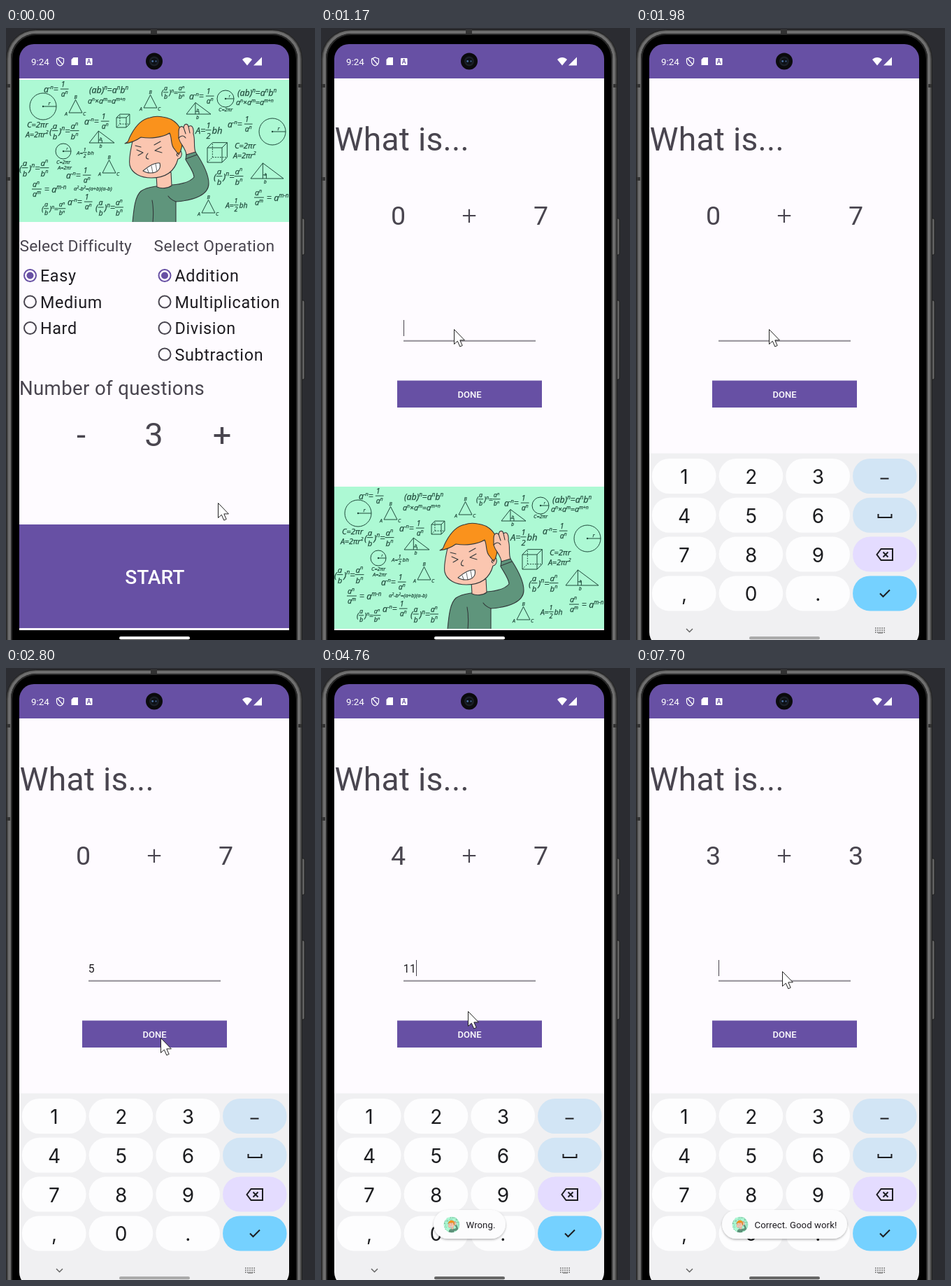
An HTML page that plays this animation: 442x874 px, repeating every 8000 ms.

```html
<!DOCTYPE html>
<html lang="en">
<head>
<meta charset="utf-8">
<title>Math quiz</title>
<style>
  html, body { margin: 0; width: 100%; height: 100%; overflow: hidden; background: #2b2c31; }
  svg { display: block; }
  text { font-family: Roboto, sans-serif; white-space: pre; }
  .math { font-family: "Open Sans", sans-serif; font-style: italic; fill: #1f4a3b; stroke: #1f4a3b; stroke-width: .25; }
  .line { fill: none; stroke: #1f4a3b; stroke-width: 1; }
  .key { font-family: Inter, sans-serif; font-size: 28px; fill: #1c1d20; text-anchor: middle; }
</style>
</head>
<body>
<svg id="stage" width="442" height="874" viewBox="0 0 442 874"></svg>
<script>
const LOOP = 8000;
const PURPLE = '#6750a4', INK = '#49454f', DARK = '#1d1b20', PAPER = '#fefbff';

const rect = (x, y, w, h, fill, more = '') =>
  `<rect x="${x}" y="${y}" width="${w}" height="${h}" fill="${fill}" ${more}/>`;
const circle = (x, y, r, more) => `<circle cx="${x}" cy="${y}" r="${r}" ${more}/>`;
const path = (d, more = 'class="line"') => `<path d="${d}" ${more}/>`;
const label = (x, y, size, str, { fill = INK, gap = 0, mid = false, weight = 400, id = '' } = {}) =>
  `<text ${id && `id="${id}"`} x="${x}" y="${y}" font-size="${size}" fill="${fill}" font-weight="${weight}"
    letter-spacing="${gap}em" ${mid ? 'text-anchor="middle"' : ''}>${str}</text>`;

// Formulas: ^x or ^(xy) is a superscript, {a|b} a fraction.
const ruler = document.createElement('canvas').getContext('2d');
function textWidth(str, size) {
  ruler.font = `italic ${size}px "Open Sans", sans-serif`;
  return ruler.measureText(str).width;
}
function formula(x, y, size, src) {
  let out = '';
  const put = (str, px, py, s) => {
    out += `<text class="math" x="${px}" y="${py}" font-size="${s}">${str}</text>`;
    return textWidth(str, s);
  };
  const run = (str, px, py, s) => {
    let w = 0;
    for (const [, top, bottom, group, single, plain] of
      str.matchAll(/\{(.+?)\|(.+?)\}|\^\((.+?)\)|\^(.)|([^{^]+)/g)) {
      if (top) {
        const a = run(top, px + w + 1, py - s * .62, s * .85);
        const b = run(bottom, px + w + 1, py + s * .52, s * .85);
        const bar = Math.max(a, b) + 2;
        out += path(`M${px + w} ${py - s * .4}h${bar}`);
        w += bar + 1;
      } else if (plain) w += put(plain, px + w, py, s);
      else w += put(group || single, px + w, py - s * .42, s * .65);
    }
    return w;
  };
  run(src, x, y, size);
  return out;
}

const POWER = 'a^(-n)= {1|a^n}', RATIO = '({a|b})^n={a^n|b^n}', QUOTIENT = '{a^n|a^m} = a^(m-n)';
const PRODUCT = '(ab)^n=a^nb^n', SUM = 'a^n×a^m=a^(m+n)', AREA = 'A={1|2}bh';
const group = (src, size, spots) => spots.map(([x, y]) => formula(x, y, size, src)).join('');

const round = (x, y, r) =>
  circle(x, y, r, 'class="line"') + circle(x, y, 1.2, 'fill="#1f4a3b"') +
  path(`M${x} ${y}h${r}`) + formula(x + r * .4, y - 2, r * .4, 'r');
const triangle = (x, y) =>
  path(`M${x} ${y}l9.500 -18.500 9.500 18.500z`) + formula(x - 6, y + 4, 7, 'A') +
  formula(x + 7.500, y - 20, 7, 'B') + formula(x + 20, y + 4, 7, 'C');
const peak = (x, y, w) =>
  path(`M${x} ${y}l${w * .37} ${-w * .47} ${w * .63} ${w * .47}zm${w * .37} 0v${-w * .47}m0 ${w * .36}h5v${w * .11}`) +
  formula(x + w * .4, y + 7, 7, 'b') + formula(x + w * .42, y - 4, 6, 'h');
const cube = (x, y, s) =>
  path(`M${x} ${y}h${s}v${s}h${-s}zl${s * .35} ${-s * .35}h${s}v${s}l${-s * .35} ${s * .35}M${x + s} ${y}l${s * .35} ${-s * .35}`) +
  path(`M${x} ${y + s}l${s * .35} ${-s * .35}h${s}m${-s} 0v${-s}`, 'class="line" stroke-dasharray="2 1.500"');

const board =
  group(POWER, 12.2, [[54, 92], [112, 138], [86, 215], [88, 253], [262, 102], [317, 142]]) +
  group(RATIO, 13.4, [[62, 152], [19, 205], [297, 217]]) +
  group(RATIO, 10.5, [[222, 96], [51, 262]]) + group(RATIO, 12.5, [[128, 261]]) +
  group(PRODUCT, 12.4, [[119, 93], [331, 97]]) +
  group(SUM, 10.7, [[117, 108], [329, 110]]) +
  group(QUOTIENT, 12.4, [[37, 235], [355, 247]]) +
  group(AREA, 13, [[271, 151]]) + group(AREA, 10.5, [[314, 257]]) + group(AREA, 8, [[101, 181]]) +
  group('C=2πr', 11.3, [[30, 142], [327, 172]]) + group('A=2πr^2', 10.8, [[28, 156], [325, 186]]) +
  group('C=2πr', 7.5, [[72, 194], [304, 119]]) + group('A=2πr', 7.5, [[74, 202]]) +
  formula(97, 232, 7.8, 'a^2-b^2=(a+b)(a-b)') +
  round(53, 112, 19) + round(82, 176, 11) + round(314, 101, 12) + round(381, 148, 19) +
  triangle(90, 121) + triangle(138, 207) + triangle(197, 114) + triangle(280, 264) +
  peak(119, 164, 36) + peak(258, 123, 35) + peak(350, 215, 47) +
  cube(158, 128, 14) + cube(288, 171, 21);

const pen = 'stroke="#33383a" stroke-width="1.1" stroke-linejoin="round" stroke-linecap="round"';
const skin = `fill="#fbc6b0" ${pen}`, bare = `fill="none" ${pen}`;
const boy =
  path('M181 278C183 256 185 240 193 233C200 228 209 227 215 226L238 224C252 223 264 219 269 213C269 206 262 197 257 188L258 179L271 177C281 192 290 208 290 222C290 238 270 246 243 248V278z', `fill="#5f957c" ${pen}`) +
  path('M209 246C211 256 211 266 210 278M243 248C238 246 234 243 232 240M257 187L273 181', bare) +
  path('M215 210L216 227C222 230 232 229 237 225L236 206z', skin) +
  path('M182 157C179 172 175 185 177 196C180 208 193 214 208 214C227 214 241 206 246 187C253 186 253 173 246 174L240 150z', skin) +
  path('M170 165C177 161 173 163 179 152C186 139 194 130 206 128C214 125 219 126 224 127C241 129 252 141 252 156C253 168 251 175 247 181L241 173C235 167 238 158 234 150C223 157 206 158 193 156C186 161 178 164 170 165z', `fill="#fa921c" ${pen}`) +
  path('M247 148C247 141 251 139 254 142C255 136 260 136 261 141C266 137 269 143 268 151C271 160 268 169 271 177L258 181C257 171 249 166 247 157z', skin) +
  path('M254 142L257 151M261 141L263 150M247 157C251 153 254 153 257 157', bare) +
  path('M187 174L196 178L189 182M222 170L213 175L223 178M185 168L193 170M212 167L221 162M203 179C199 184 200 187 204 187M247 178C244 179 243 182 246 183', bare) +
  path('M196 204C201 200 211 191 220 193C222 201 217 207 207 207C202 207 199 206 196 204z', `fill="#fff" ${pen}`) +
  path('M202 201L204 206M208 197L210 207M214 194L216 205', `fill="none" ${pen} opacity=".7"`);

const radio = (x, y, str, on) =>
  circle(x, y, 8.5, `fill="none" stroke="${on ? PURPLE : INK}" stroke-width="2"`) +
  (on ? circle(x, y, 5, `fill="${PURPLE}"`) : '') +
  label(x + 14.4, y + 8.5, 23.4, str, { fill: DARK, gap: .028 });
const radios = (x, names) => names.map((n, i) => radio(x, 353.5 + i * 37.5, n, i === 0)).join('');

const home =
  rect(19, 72, 386, 790, PAPER) + '<use href="#art"/>' +
  label(19.5, 319, 22.8, 'Select Difficulty', { gap: .005 }) +
  label(211.5, 319, 22.8, 'Select Operation', { gap: .016 }) +
  radios(34.5, ['Easy', 'Medium', 'Hard']) +
  radios(227, ['Addition', 'Multiplication', 'Division', 'Subtraction']) +
  label(19, 524, 27.6, 'Number of questions', { gap: .013 }) +
  ['-', '3', '+'].map((s, i) => label([107.5, 211.5, 309][i], 597, 47, s, { mid: true })).join('') +
  rect(19, 709, 386, 148, PURPLE) +
  label(212.8, 794, 28.2, 'START', { fill: '#fff', mid: true, weight: 500 });

const question =
  rect(19, 72, 386, 790, PAPER) + '<use href="#art" y="581"/>' +
  label(19.5, 174.5, 46.2, 'What is...', { gap: .006 }) +
  label(110.5, 281, 37.6, '0', { mid: true, id: 'left' }) +
  label(212, 281, 37.6, '+', { mid: true, weight: 300 }) +
  label(314.5, 281, 37.6, '7', { mid: true, id: 'right' }) +
  label(117.8, 435, 15.7, '', { fill: DARK, gap: .031, id: 'answer' }) +
  rect(118, 445, 189, 2.5, '#d3d0d5', 'id="rule"') +
  rect(118, 446.5, 189, 1, '#55515b', 'id="focus"') +
  rect(118, 417, 1, 23, INK, 'id="caret"') +
  rect(109, 503.5, 207, 38.5, PURPLE) + rect(109, 503.5, 207, 38.5, '#fff', 'id="ripple"') +
  label(212.6, 527.6, 13, 'DONE', { fill: '#fff', mid: true, weight: 500 });

const glyphs = [
  'M349.500 643.500h12', 'M346.500 694v5h19v-5',
  'M350.500 744h16.500v16h-16.500l-6-8zM353.500 748.500l7 7m0-7l-7 7', 'M349 807.500l4.500 4.500 9.500-9.500'];
const keyColors = ['#d2e5f5', '#d2e5f5', '#e4dcff', '#75d1ff'];
const keyboard = rect(19, 607.5, 386, 270, '#f0f0f2') +
  ['123', '456', '789', ',0.'].map((row, r) => {
    const y = 615 + r * 55.8;
    const cap = (c, fill) => rect(23 + c * 95.7, y, 91.5, 50, fill, 'rx="24.5"');
    return [...row].map((s, c) => cap(c, '#fdfdfe') +
      `<text class="key" x="${69 + c * 95.7}" y="${y + 36}">${s}</text>`).join('') +
      cap(3, keyColors[r]) + path(glyphs[r], 'fill="none" stroke="#1c1d20" stroke-width="2"');
  }).join('') +
  path('M72 858l4.500 4.500 4.500-4.500', 'fill="none" stroke="#666" stroke-width="1.500"') +
  path('M342 857h14M342 860h14M342 863h14', 'stroke="#666" stroke-width="1.500" stroke-dasharray="1.600 1.500"') +
  path('M346 864h7', 'stroke="#666" stroke-width="1.200"');

const toast = (id, x, w, str) => `<g id="${id}">
  ${rect(x, 774, w, 41, '#fcfcfd', 'rx="20.5" filter="url(#shadow)"')}
  <g><g transform="translate(${x + 26} 795)" clip-path="url(#disc)">
    <use href="#art" transform="scale(.125) translate(-218 -176)"/></g>
  ${label(x + 46.5, 800, 13.2, str, { fill: DARK, gap: .005 })}</g></g>`;

const phone =
  rect(0, 0, 442, 874, '#2b2c31') +
  [[272, 52], [389, 113]].map(([y, h]) => rect(421, y, 6, h, '#646464', 'rx="2" stroke="#202020"')).join('') +
  rect(.5, 2.5, 423, 940, '#464646', 'rx="42" stroke="#202020"') +
  rect(5, 6, 414, 940, '#000', 'rx="38" stroke="#6e6e6e" stroke-width="4"') +
  rect(8, 9, 408, 940, '#000', 'rx="35" stroke="#2a2a2a" stroke-width="2"') +
  rect(207, 2, 9, 6, '#333') +
  [80, 213].map(y => rect(1, y, 5, 5, '#333')).join('') + rect(418, 80, 5, 5, '#333');

const status =
  rect(19, 23, 386, 49, PURPLE) +
  label(36, 52.5, 13.4, '9:24', { fill: '#fff' }) +
  path('M77.500 42l5 2v4c0 3-2 5-5 6c-3-1-5-3-5-6v-4zM74 44l7 8', 'fill="none" stroke="#fff" stroke-width="1.200"') +
  path('M96.500 42h6.500v11h-9.500v-8z', 'fill="#fff"') +
  rect(114, 43, 9.5, 10, '#fff', 'rx="1"') +
  label(118.7, 51.3, 8.5, 'A', { fill: PURPLE, mid: true, weight: 700 }) +
  path('M338 45c4-4 10-4 14 0l-7 8.500z', 'fill="#fff"') + path('M366 41.500v12h-12z', 'fill="#fff"') +
  circle(212, 47.5, 12, 'fill="#0b0b0d"') + circle(212, 47.5, 7, 'fill="#1b2027"') +
  circle(212, 47.5, 4.5, 'fill="#0d1116"') + circle(209.7, 47.5, 1.4, 'fill="#4a6fa0"') +
  circle(214.5, 47.5, 1.2, 'fill="#38557c"');

document.getElementById('stage').innerHTML = `
<defs>
  <clipPath id="screen"><rect x="19" y="23" width="386" height="861" rx="21"/></clipPath>
  <clipPath id="picture"><rect x="19" y="74" width="386" height="203"/></clipPath>
  <clipPath id="disc"><circle r="11.3"/></clipPath>
  <filter id="shadow" x="-20%" y="-50%" width="140%" height="200%">
    <feDropShadow dx="0" dy="1.5" stdDeviation="1.6" flood-opacity=".3"/></filter>
  <g id="art"><g clip-path="url(#picture)">${rect(19, 74, 386, 203, '#adf9d4')}${board}${boy}</g></g>
</defs>
${phone}
<g clip-path="url(#screen)">
  <g id="home">${home}</g><g id="question">${question}</g>
  ${rect(19, 860, 386, 24, '#000')}
  <g id="keyboard">${keyboard}</g>
  ${rect(162, 869, 101, 4.3, '#fff', 'id="handle" rx="2.1"')}
  ${toast('wrong', 161, 103, 'Wrong.')}${toast('correct', 123, 179, 'Correct. Good work!')}
  ${status}
</g>
<path id="mouse" d="M.5 .5V21.500L5.300 17.200 8.800 25 12.200 23.500 8.800 15.900H15.400z" fill="#fff" stroke="#222" stroke-width="1"/>`;

// Each track lists [start time, value]; a value holds until the next one.
const tracks = {
  open: [[0, 0], [120, .4], [240, .85], [360, 1]],
  mouse: [[0, [303, 678]], [120, [295, 640]], [240, [274, 555]], [360, [254, 484]], [500, [374, 527]],
    [650, [290, 496]], [770, [234, 477]], [920, [203, 443]], [1050, [190, 430]], [2370, [228, 527]],
    [2520, [224, 528]], [2650, [221, 528]], [3310, [213, 512]], [3430, [203, 491]], [3580, [197, 459]],
    [3700, [192, 440]], [4760, [210, 490]], [4880, [223, 519]], [6320, [219, 486]], [6470, [209, 433]]],
  answer: [[0, 'Your Answer...'], [1050, ''], [2370, '5'], [3190, ''], [4610, '1'], [4760, '11'], [5780, '']],
  caret: [[0, 0], [1050, 1], [1710, 0], [2130, 1], [2800, 0], [3190, 1], [3700, 0], [4100, 1],
    [5270, 0], [5780, 1], [6320, 0], [6730, 1], [7300, 0], [7700, 1]],
  sums: [[0, '07'], [3190, '47'], [5780, '33']],
  keys: [[0, 300], [1320, 44.5], [1440, 10], [1560, 0]],
  handle: [[0, '#fff'], [1710, '#d4d4d4'], [1980, '#aaa'], [3190, '#666']],
  ripple: [[0, 0], [3070, .05], [3190, .12], [3310, .1], [3430, .08], [3580, .04], [3700, 0],
    [5780, .11], [5900, .06], [6050, 0]],
  wrong: [[0, 0], [3190, .25], [3310, .75], [3430, 1], [5270, .7], [5390, .3], [5510, 0]],
  correct: [[0, 0], [5780, .25], [5900, .8], [6050, 1]],
};
const at = (name, t) => tracks[name].findLast(([start]) => start <= t)[1];
const $ = id => document.getElementById(id);
const set = (id, attrs) => { for (const k in attrs) $(id).setAttribute(k, attrs[k]); };

function showToast(id, level) {
  const el = $(id), [card, content] = el.children;
  const cx = 212.5, cy = 795, scale = .96 + .04 * level;
  el.setAttribute('transform', `translate(${cx} ${cy}) scale(${scale}) translate(${-cx} ${-cy})`);
  card.setAttribute('opacity', Math.min(1, level * 3.6));
  content.setAttribute('opacity', level);
}

function draw(t) {
  const focused = t >= 1050, answer = at('answer', t), [left, right] = at('sums', t);
  set('question', { opacity: at('open', t) });
  set('mouse', { transform: `translate(${at('mouse', t)})` });
  $('answer').textContent = answer;
  $('left').textContent = left;
  $('right').textContent = right;
  set('focus', { opacity: +focused });
  set('rule', { opacity: focused ? .6 : 1 });
  set('caret', { x: 118 + (focused ? answer.length * 9 : 0), opacity: at('caret', t) });
  set('ripple', { opacity: at('ripple', t) });
  set('keyboard', { transform: `translate(0 ${at('keys', t)})` });
  set('handle', { fill: at('handle', t) });
  showToast('wrong', at('wrong', t));
  showToast('correct', at('correct', t));
}

function tick() {
  draw(performance.now() % LOOP);
  requestAnimationFrame(tick);
}
tick();
</script>
</body>
</html>
```
